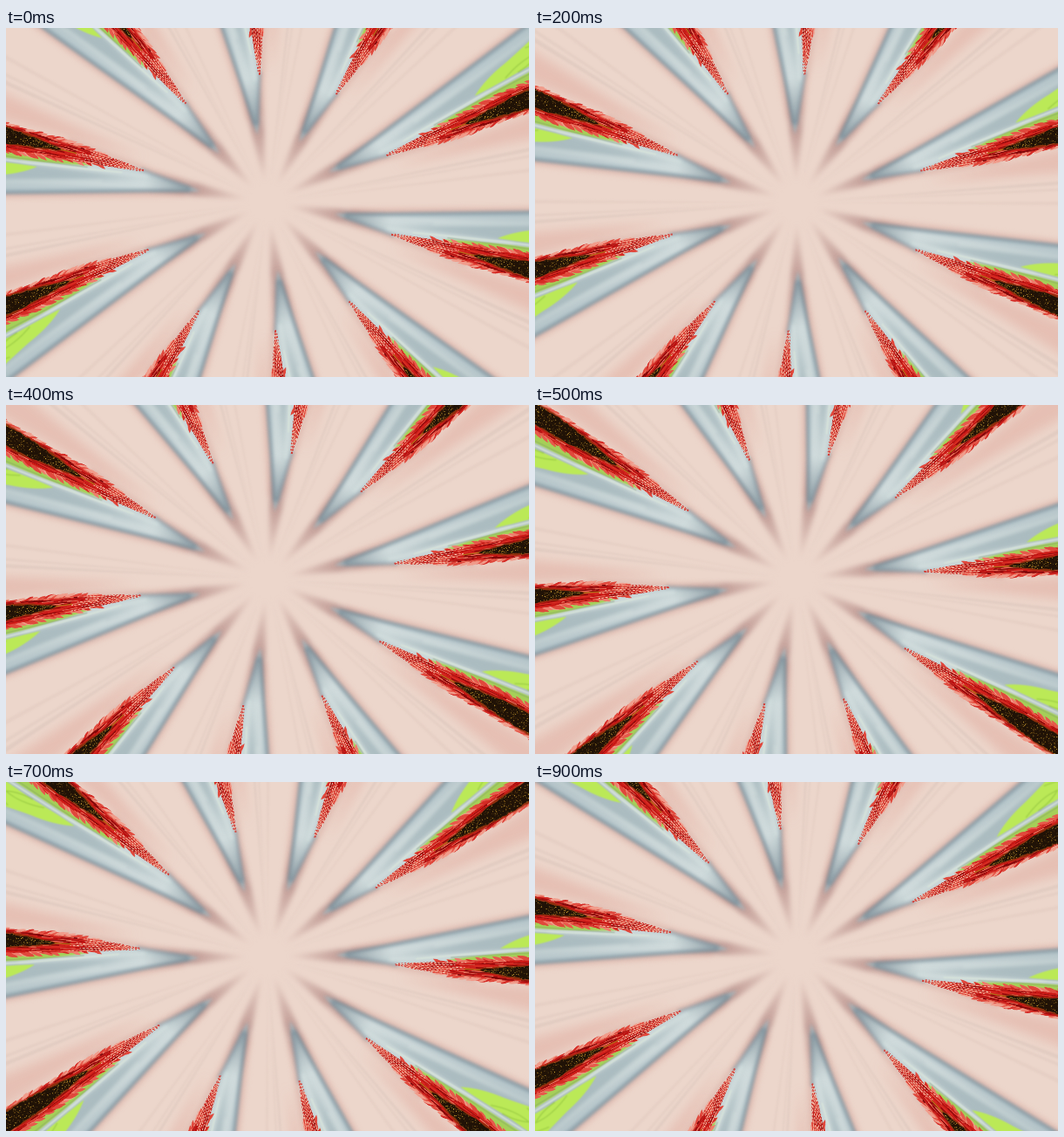
Write an HTML page with a canvas that moves like this. It is 600x400 px and loops after 1 s.

```html
<!DOCTYPE html>
<html lang="en">
<head>
<meta charset="utf-8">
<title>Turning spikes</title>
<style>
  html, body { margin: 0; width: 100%; height: 100%; overflow: hidden; background: #ecd6cb; }
  canvas { display: block; width: 600px; height: 400px; }
</style>
</head>
<body>
<canvas id="stage" width="600" height="400"></canvas>
<script>
const stage = document.getElementById('stage').getContext('2d');
const ARMS = 10, STEPS = 10, STEP_MS = 100, START = 14.4;
const RES = 2, LEN = 380, TOP = 110, HEIGHT = 240;
const rad = d => d * Math.PI / 180;

let seed = 7;
function rnd(a = 0, b = 1) {
  seed = (seed * 16807) % 2147483647;
  return a + (b - a) * seed / 2147483647;
}
const pick = list => list[Math.floor(rnd() * list.length)];

// Straight-line interpolation through [x, y] knots
function along(knots, x) {
  let i = 1;
  while (i < knots.length - 1 && knots[i][0] < x) i++;
  const [x0, y0] = knots[i - 1], [x1, y1] = knots[i];
  return y0 + (y1 - y0) * (x - x0) / (x1 - x0);
}

// One arm lies along +x, with the hub at 0,0
const arm = document.createElement('canvas');
arm.width = LEN * RES;
arm.height = HEIGHT * RES;
const g = arm.getContext('2d');
g.setTransform(RES, 0, 0, RES, 0, TOP * RES);
g.lineJoin = 'round';

function soft(px, draw) {
  g.filter = px ? `blur(${px * RES}px)` : 'none';
  draw();
  g.filter = 'none';
}
function fill(d, color, blur = 0) {
  soft(blur, () => { g.fillStyle = color; g.fill(new Path2D(d)); });
}
function line(d, color, width, blur = 0) {
  soft(blur, () => {
    g.strokeStyle = color;
    g.lineWidth = width;
    g.stroke(new Path2D(d));
  });
}
function ray(deg, half, color, blur, from = 0) {
  const p = (r, a) => `${r * Math.cos(rad(a))} ${r * Math.sin(rad(a))}`;
  fill(`M${p(from, deg)}L${p(390, deg - half)}L${p(390, deg + half)}Z`, color, blur);
}
// Colour that fades in from x0 to x1 and out again at x2
function fade(rgb, alpha, x0, x1, x2) {
  const f = g.createLinearGradient(x0, 0, x2, 0);
  f.addColorStop(0, `rgba(${rgb},0)`);
  f.addColorStop((x1 - x0) / (x2 - x0), `rgba(${rgb},${alpha})`);
  f.addColorStop(1, `rgba(${rgb},0)`);
  return f;
}

function drawGround() {
  ray(5.5, 3, 'rgba(214,140,126,.3)', 6, 150);
  ray(10.2, .4, 'rgba(165,145,140,.15)', 1, 25);
  ray(11.6, .3, 'rgba(178,155,148,.13)', 1, 20);
  ray(14.6, .4, 'rgba(180,155,148,.11)', 1, 15);
}

const WEDGE = 'M78 -6.5L390 -91L390 12L300 9L150 1Z';

function drawBlade() {
  fill('M20 -1.5L135 -24L135 4Z', fade('172,128,124', .62, 20, 82, 135), 3);
  line('M95 -12L390 -91', 'rgba(205,150,140,.42)', 9, 3.5);
  line('M100 -4L150 2L240 11', 'rgba(205,150,140,.4)', 8, 3.5);

  const tint = g.createConicGradient(rad(-20), 82, -7);
  [[4, '#93a6ae'], [6, '#b4c4c9'], [9, '#cfdadb'], [13, '#d0dbdc'],
   [18, '#ccd8d9'], [23, '#c6d3d5'], [28, '#b3c2c7']]
    .forEach(([deg, c]) => tint.addColorStop(deg / 360, c));
  fill(WEDGE, tint, 1.6);

  fill('M76 -6.5L140 -24L140 1Z', fade('98,116,128', .6, 76, 88, 140), 3);
  line('M90 -9L390 -90', 'rgba(98,119,133,.55)', 3, 2);
  line('M90 -6L150 1', 'rgba(98,119,133,.5)', 3, 2);

  g.save();
  g.clip(new Path2D(WEDGE));
  fill('M150 -10Q250 -22 390 -32L390 -78Q280 -48 150 -10Z', 'rgba(140,162,170,.55)', 4);
  line('M190 -24Q260 -40 390 -77', 'rgba(222,232,230,.5)', 2.5, 2);
  line('M140 -5Q220 -15 285 -24', 'rgba(222,232,230,.6)', 3, 2);
  g.restore();
}

function drawLeaf() {
  fill('M205 -9Q245 -17 280 -22L390 -35L390 0L220 0Z', '#a5cf58', .9);
  fill('M266 -26Q285 -40 312 -48Q345 -60 390 -79L390 -39L330 -34Q290 -28 266 -26Z', '#bbe957', .9);
  line('M306 -32Q332 -46 352 -45Q340 -36 322 -33', 'rgba(127,178,52,.5)', 1.2, .7);
  line('M340 -56Q366 -55 385 -45', 'rgba(127,178,52,.45)', 1.2, .7);
  line('M170 -8Q240 -19 275 -24L390 -38', 'rgba(215,228,218,.9)', 1.7, .7);
  line('M210 -12Q260 -19 390 -32', 'rgba(125,158,105,.6)', 1, .5);
}

const upper = [[145, -1], [186, -5.5], [250, -12], [300, -17], [390, -20]];
const lower = [[145, 1], [186, 6], [250, 12], [300, 13.5], [390, 15]];
const core = [[248, 0], [264, 3], [285, 5.5], [315, 8.5], [390, 11]];
const across = (x, t) => along(upper, x) * (1 - t) + along(lower, x) * t;

function drawPetals() {
  const shades = ['#e0483c', '#ee7d6c', '#d52c26', '#f09c8b', '#e65a4c'];
  for (let x = 385; x > 200; x -= 4) {
    for (const [edge, side] of [[upper, -1], [lower, 1]]) {
      const y = along(edge, x), s = rnd(7, 13);
      const tip = y + side * rnd(-1, 2.5);
      fill(`M${x - s} ${tip}Q${x - 2} ${tip + side} ${x + 4} ${y - side * rnd(3, 6)}` +
           `L${x} ${y - side * 9}Z`, pick(shades));
    }
  }
}

function drawNeedles() {
  let body = 'M180 0';
  for (let x = 200; x <= 390; x += 10) body += `L${x} ${across(x, .12)}`;
  for (let x = 390; x >= 200; x -= 10) body += `L${x} ${across(x, .88)}`;
  fill(body + 'Z', '#cb1f1b', .8);

  const reds = ['#c91512', '#a60a0c', '#e0382b', '#d4211c', '#7e0608', '#ee7660'];
  for (let i = 0; i < 300; i++) {
    const x = 158 + 190 * Math.pow(rnd(), 1.2), len = rnd(10, 28);
    const t = rnd(.08, .92);
    line(`M${x} ${across(x, t)}L${x + len} ${across(x + len, t)}`, pick(reds), rnd(.5, 1.2));
  }
  // Alternating threads that fray towards the point
  for (let i = 0; i < 13; i++) {
    const t = (i + .5) / 13, x = 143 + rnd(0, 24), end = x + rnd(45, 70);
    g.setLineDash(i % 2 ? [3, 1.4] : [2, 1.6]);
    line(`M${x} ${across(x, t)}L${end} ${across(end, t)}`,
      i % 2 ? '#f8d3bb' : '#d2302a', .75);
  }
  g.setLineDash([]);
}

function drawCore() {
  const outline = pad => {
    let d = `M${244 - pad * 4} 0`;
    for (let x = 250; x <= 390; x += 4)
      d += `L${x} ${-along(core, x) - pad - rnd(0, 1.8)}`;
    for (let x = 390; x >= 250; x -= 4)
      d += `L${x} ${along(core, x) + pad + rnd(0, 1.8)}`;
    return d + 'Z';
  };
  fill(outline(1.2), '#8a2f0c', .4);
  line('M226 0L252 0', '#b5701a', 1.3);
  fill(outline(0), '#201206');
  const gold = ['#7b5715', '#c2942a', '#4d3510', '#dcae38', '#694315'];
  for (let i = 0; i < 380; i++) {
    const x = rnd(248, 379), y = along(core, x) * rnd(-1.1, 1.1);
    g.fillStyle = pick(gold);
    g.fillRect(x, y, rnd(.5, 1.3), rnd(.4, .9));
  }
}

drawGround();
drawBlade();
drawLeaf();
drawPetals();
drawNeedles();
drawCore();

function paint(step) {
  stage.setTransform(1, 0, 0, 1, 0, 0);
  stage.fillStyle = '#ecd6cb';
  stage.fillRect(0, 0, 600, 400);
  for (let i = 0; i < ARMS; i++) {
    stage.setTransform(1, 0, 0, 1, 300, 200);
    stage.rotate(rad(START + step * 360 / ARMS / STEPS + i * 360 / ARMS));
    stage.drawImage(arm, 0, -TOP, LEN, HEIGHT);
  }
}

let shown = -1;
const begin = performance.now();
function tick() {
  const step = Math.floor((performance.now() - begin) / STEP_MS) % STEPS;
  if (step !== shown) paint(shown = step);
  requestAnimationFrame(tick);
}
tick();
</script>
</body>
</html>
```
